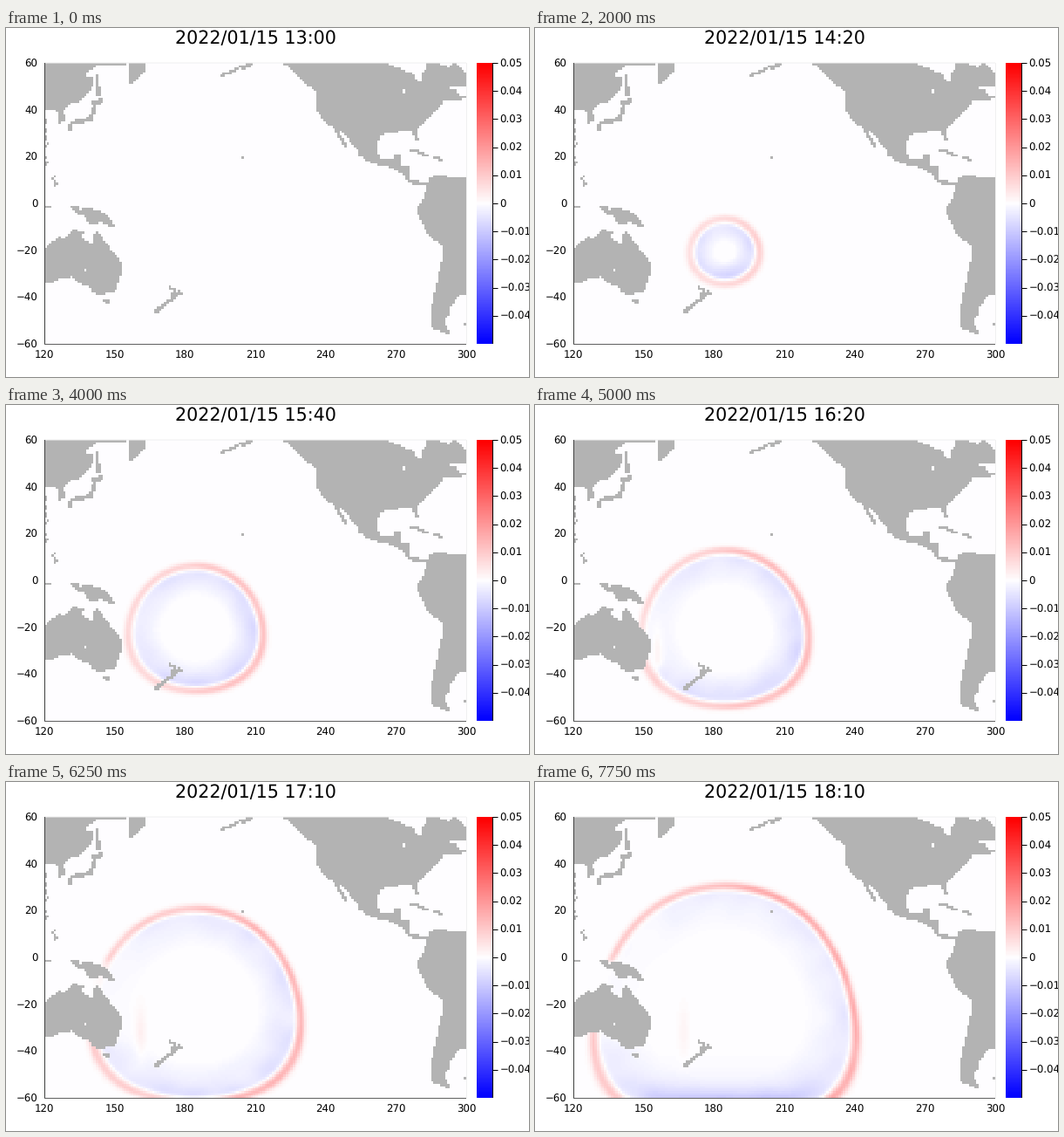
These frames come from a looping animation (600 by 400 pixels, 8 s). A matplotlib script:

```python
import numpy as np
import matplotlib.pyplot as plt
from matplotlib.animation import FuncAnimation
from matplotlib.colors import LinearSegmentedColormap
from matplotlib.path import Path

W, H, DPI = 600, 400, 100
FRAMES, INTERVAL = 32, 250
LEFT, RIGHT, TOP, BOTTOM = 44, 528, 40, 362
SOURCE = (184.6, -20.5)

plt.rcParams["font.family"] = "DejaVu Sans"
plt.rcParams["text.hinting"] = "none"

rng = np.random.default_rng(15)
lon, lat = np.meshgrid(np.arange(120.5, 300), np.arange(59.5, -60, -1))
cells = np.column_stack([lon.ravel(), lat.ravel()])
land = np.zeros(lon.shape, bool)


def fill(*points, value=True):
    """Set the cells whose centres lie inside a lon/lat polygon."""
    land[Path(points).contains_points(cells).reshape(lon.shape)] = value


def stroke(radius, *points, value=True):
    """Set the cells near a lon/lat polyline."""
    for (x, y), (x2, y2) in zip(points, points[1:]):
        dx, dy = x2 - x, y2 - y
        t = ((lon - x) * dx + (lat - y) * dy) / (dx * dx + dy * dy)
        t = np.clip(t, 0, 1)
        land[np.hypot(lon - x - t * dx, lat - y - t * dy) < radius] = value


def islets(count, start, end):
    """Scatter short runs of cells along a line."""
    for t in (np.arange(count) + rng.uniform(0.2, 0.8, count)) / count:
        x, y = np.add(start, t * np.subtract(end, start))
        stroke(0.6, (x, y), (x + rng.uniform(0.1, 1), y + 0.5))


# Asia, Kamchatka, Sakhalin, Japan
fill((119, 61), (155, 61), (155, 59), (143, 59), (137, 55), (141.2, 53.5),
     (140, 48), (135.5, 43.5), (131.5, 43), (128, 39), (129.5, 35),
     (126.4, 34.4), (126.4, 37.6), (124, 40), (119, 39.4))
fill((156, 61), (163, 61), (163, 57), (158, 51), (156, 51))
stroke(0.7, (142.6, 54), (143, 46.4))
stroke(1.2, (141.2, 42.6), (144, 43.6))
stroke(0.9, (141.4, 40.6), (140, 36.2), (136, 35), (132, 34.4))
stroke(0.9, (131, 33.4), (130.8, 31.8))
# Islands of the western edge
islets(6, (120.2, 37), (120.2, 14))
islets(3, (123, 11.5), (125.2, 6.5))
stroke(0.6, (120.5, -1.5), (122.5, -1.5))
# New Guinea
fill((131, -1), (134.6, -0.8), (135, -3), (138, -1.4), (145, -4),
     (147.8, -6), (150.6, -10.2), (148.5, -10.4), (144, -7.8), (142, -9.2),
     (138, -8.2), (138, -5.9), (132.8, -4))
# Australia with a salt lake, Tasmania
fill((119, -20.2), (126, -14.3), (129, -15), (132, -11.1), (136.8, -12),
     (135.6, -15), (140.5, -17.4), (142, -11), (145.4, -15.4), (149, -20.4),
     (153, -25.2), (153.4, -29), (150.2, -37.4), (144.5, -39), (141, -38.2),
     (138, -34.8), (136, -34.7), (131.5, -31.4), (126, -32.4),
     (123.3, -34), (119, -34))
stroke(0.5, (137.4, -28.5), (137.6, -28.5), value=False)
fill((145, -41), (148, -41), (148, -43), (147, -44))
# New Zealand
stroke(0.7, (173.3, -35.4), (175.5, -37.4))
stroke(1, (175, -38.7), (177.6, -38.4))
stroke(0.8, (175.6, -39.8), (174.8, -41))
stroke(0.9, (173, -41.6), (171, -43.6), (168, -45.8))
# Alaska Peninsula, Kodiak, Hawaii
stroke(0.6, (195.5, 54.5), (200, 56.2), (203, 58), (208, 59.6))
stroke(0.6, (204.5, 57.5), (207.5, 58.5))
stroke(0.5, (204.4, 19.5), (204.6, 19.5))
# North and Central America
fill((219.6, 61), (225, 57.6), (232, 50.6), (235.7, 48), (235.6, 40),
     (239.5, 35), (244, 31.5), (247, 31.2), (250.7, 26), (254, 22.8),
     (254.6, 20), (260.5, 16.8), (266, 15.9), (272.3, 13), (276, 8.6),
     (282.6, 7.6), (282.6, 9), (276.4, 10.4), (276.5, 15.6), (271.6, 15.8),
     (272.3, 21.3), (269.6, 21.2), (269, 18.6), (263.6, 19.2), (262, 22),
     (262.6, 28), (266, 30), (279, 31.2), (284, 36), (289.6, 41.8),
     (290, 43.8), (296.8, 43.8), (301, 46), (301, 54.8), (295, 61))
stroke(0.9, (277.9, 31), (278.8, 27.6))
stroke(0.6, (244.5, 31), (248.8, 24.5))
# Hudson Bay, Ungava Bay, Gulf of St Lawrence, Lake Superior
fill((267, 61), (267.6, 59), (277.7, 55.3), (279, 51.6), (281.2, 52),
     (281.2, 55.6), (283.3, 57.3), (282, 61), value=False)
stroke(1.2, (290.5, 60), (293, 59.6), value=False)
fill((291, 48.5), (294, 50.1), (301, 50.2), (301, 46.4), (297, 46),
     (295.5, 48.8), value=False)
stroke(0.6, (273.5, 47.5), (273.5, 48.5), value=False)
# Antilles
stroke(0.6, (276.5, 22.5), (279, 22.2))
stroke(0.6, (280, 21.5), (283, 20.4))
stroke(0.7, (287, 19.5), (289.4, 18.6))
# South America, Falklands
fill((282.6, 8), (284.5, 11), (288, 12), (301, 10.4), (301, -38.6),
     (297.8, -39), (295, -41.8), (292.6, -45.8), (293.6, -47.2), (291, -50),
     (292, -54), (294.6, -55), (292, -55.8), (285, -53), (285, -46.2),
     (286.4, -38), (289.6, -25), (289.6, -18.2), (283.4, -13), (278.6, -3.6),
     (279.6, -0.8), (282.4, 2.6))
stroke(0.5, (299.4, -51.5), (299.6, -51.5))

# Great-circle distance in degrees from the eruption
a, b = np.radians(lat), np.radians(SOURCE[1])
gap = np.radians(lon - SOURCE[0])
dist = np.degrees(np.arccos(np.clip(
    np.sin(a) * np.sin(b) + np.cos(a) * np.cos(b) * np.cos(gap), -1, 1)))


def sigmoid(x):
    return 1 / (1 + np.exp(-np.clip(x, -40, 40)))


# Smooth unevenness of the sea floor
rough = sum(np.sin(u * lon + v * lat + p) for u, v, p in
            rng.uniform((-0.5, -0.5, 0), (0.5, 0.5, 6.28), (9, 3))) / 4

# The crest is weak to the west and dies out over the shelf seas
east = sigmoid((lon - SOURCE[0]) / 5)
shelf = sigmoid((lat + 24) / 1.5) * sigmoid((-1.5 - lat) / 0.6)
depth = (0.68 + 0.36 * east) * (1 - shelf * sigmoid((147 - lon) / 2))
depth *= 1 + 0.07 * rough

# The trough is deepest to the southeast and faint off Australia
angle = np.arctan2(lat - SOURCE[1], lon - SOURCE[0])
bowl = (1 + 0.2 * np.cos(angle + np.pi / 4)) * (1 + 0.25 * rough)
bowl *= 1 - 0.75 * sigmoid((160 - lon) / 2.5) * sigmoid((lat + 36) / 1.5)


def wave(k):
    """Sea level, as a fraction of the colour range, after k steps."""
    front = 1.1 + 1.61 * k
    start = min(1, k / 3)
    crest = (0.13 + 0.0055 * k) * np.exp(-((dist - front) / 1.12) ** 2 / 2)

    edge = front - 2.4
    inner = max(0, 1.2 * k - 5.5)
    slope = np.clip((dist - inner) / max(edge - inner, 1), 0, 1)
    trough = (0.18 - 0.0035 * k) * slope * sigmoid((edge - dist) / 0.4)
    level = start * (crest * depth - trough * bowl)

    if k >= 20:  # echo from the Australian coast
        line = np.exp(-((lon - 136 - k) / 1.5) ** 2 / 2)
        span = np.exp(-((lat + 32) / 10) ** 2)
        level += (0.07 - 0.003 * (k - 20)) * line * span
    if k >= 24:  # build-up against the southern limit
        rise = np.exp(-(lat + 59.5) / (1 + 0.55 * (k - 24)))
        level -= 0.16 * rise * sigmoid((front - 5 - dist) / 1.5)
    return np.ma.array(level, mask=land)


fig = plt.figure(figsize=(W / DPI, H / DPI), dpi=DPI, facecolor="white")
ax = fig.add_axes([0, 0, 1, 1])
ax.axis("off")

cmap = LinearSegmentedColormap.from_list(
    "level", ["#0000ff", "#fefdff", "#ff0000"], 255)
cmap.set_bad("#b3b3b3")
style = dict(cmap=cmap, vmin=-1, vmax=1, aspect="auto")
sea = ax.imshow(wave(0), extent=(LEFT, RIGHT, BOTTOM, TOP),
                interpolation="nearest", **style)
ax.imshow(np.linspace(1, -1, 255)[:, None],
          extent=(540, 558, BOTTOM, TOP), **style)
ax.set_xlim(0, W)
ax.set_ylim(H, 0)


def line(xs, ys, color="black"):
    ax.plot(xs, ys, color=color, lw=0.72, solid_capstyle="butt", snap=False)


def label(x, y, text, align, size=11.8):
    return ax.text(x, y, text, ha=align, va="baseline", color="black",
                   fontsize=size * 72 / DPI)


def minus(text):
    return text.replace("-", "\u2212")


line([LEFT, RIGHT], [TOP, TOP], "#f0f0f0")
line([RIGHT + 0.5] * 2, [TOP, BOTTOM], "#f0f0f0")
line([LEFT + 0.5] * 2, [TOP, BOTTOM + 1], "#404040")
line([LEFT, RIGHT], [BOTTOM + 0.5] * 2, "#606060")
for n in range(7):
    label(LEFT + n * (RIGHT - LEFT) / 6, 378.5, str(120 + 30 * n), "center")
    y = TOP + n * (BOTTOM - TOP) / 6
    label(36.6, y + 4.7, minus(str(60 - 20 * n)), "right")

line([558.5] * 2, [TOP, BOTTOM])
for n in range(5, -5, -1):
    y = TOP + (5 - n) * (BOTTOM - TOP) / 10
    line([558, 564.5], [round(y) + 0.5] * 2)
    label(566.5, y + 4.4, minus(f"{n / 100:.2f}") if n else "0", "left")

title = label(286.3, 18.5, "", "center", 20.65)


def update(k):
    hour, minute = divmod(13 * 60 + 10 * k, 60)
    title.set_text(f"2022/01/15 {hour}:{minute:02d}")
    sea.set_data(wave(k))
    return sea, title


anim = FuncAnimation(fig, update, frames=FRAMES, interval=INTERVAL,
                     repeat=True, repeat_delay=0)
plt.show()
```
